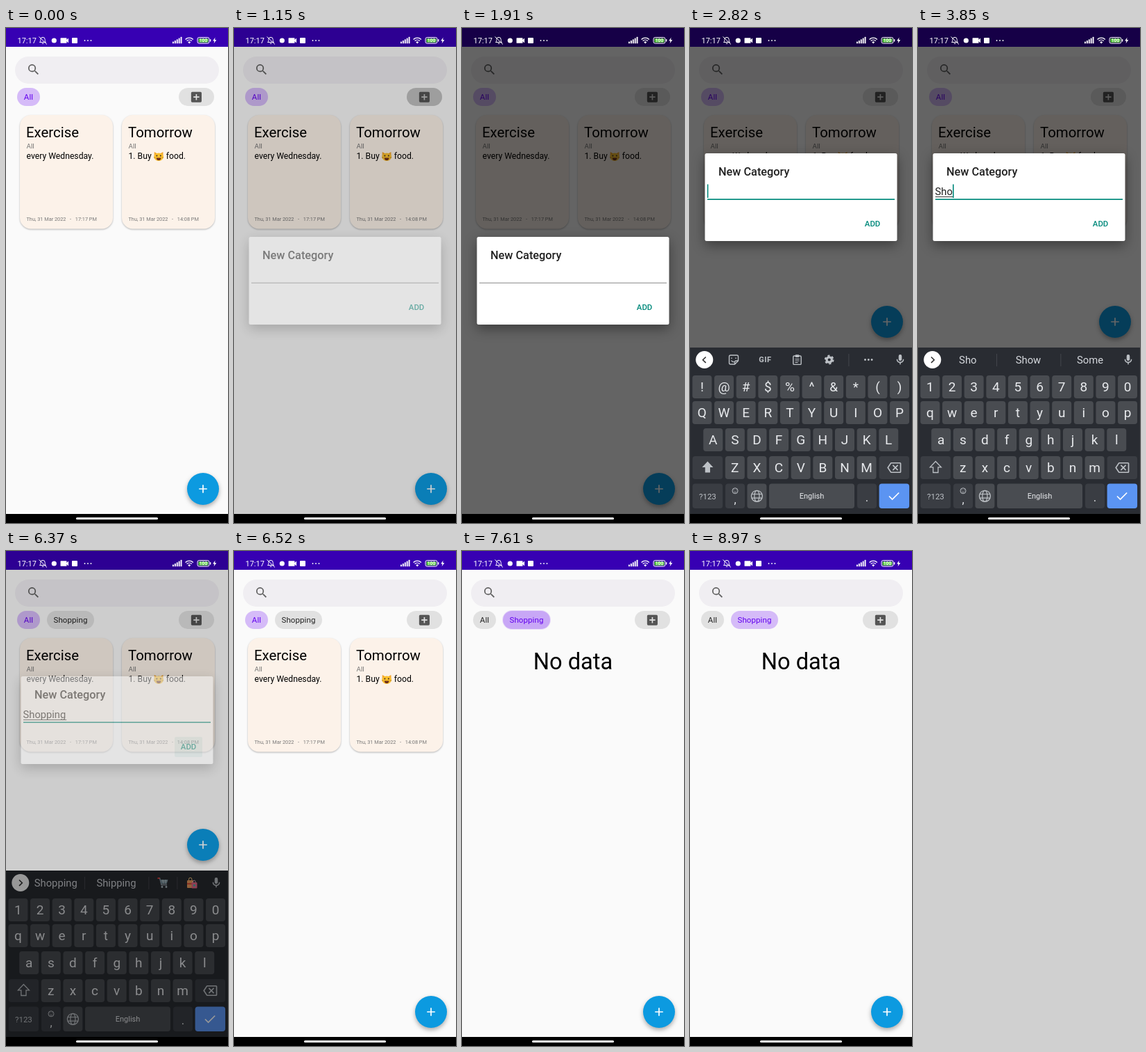
Recreate the animation shown at these times as an HTML page. Size 320x711 px, loop 9000 ms.

```html
<!DOCTYPE html>
<html lang="en">
<head>
<meta charset="utf-8">
<title>New category</title>
<style>
html, body { margin: 0; width: 100%; height: 100%; overflow: hidden; background: #000; }
svg { display: block; width: 100vw; height: 100vh; font-family: Roboto, "Noto Sans", sans-serif; }
</style>
</head>
<body>
<svg id="stage" viewBox="0 0 320 711"></svg>
<script>
const LOOP = 9000, WORD = 'Shopping';
const OPEN = 1080, FOCUS = 2350, CLOSE = 6290, RESIZE = 6480, PICK = 7460;
const TYPED = [2980, 3400, 3720, 4040, 4260, 4660, 5040, 5340];
const HINTS = ['', 'So', 'She', 'Show', 'Shop', 'Shopping', 'Shopping', 'Shopping', 'Shipping'];

const ramp = (t, from, to) => Math.max(0, Math.min(1, (t - from) / (to - from)));
const ease = p => 1 - (1 - p) ** 3;
const pulse = (t, from, span) => Math.min(ramp(t, from, from + 80), 1 - ramp(t, from + span / 2, from + span));

// SVG helpers
const box = (x, y, w, h, r, fill, more = '') =>
  `<rect x="${x}" y="${y}" width="${w}" height="${h}" rx="${r}" fill="${fill}" ${more}/>`;
const dot = (x, y, r, fill, more = '') => `<circle cx="${x}" cy="${y}" r="${r}" fill="${fill}" ${more}/>`;
const text = (s, x, y, size, fill, more = '') =>
  `<text x="${x}" y="${y}" font-size="${size}" fill="${fill}" ${more}>${s.replace('&', '&amp;')}</text>`;
const path = (d, fill, more = '') => `<path d="${d}" fill="${fill}" ${more}/>`;
const line = (d, color, width = 1.4, more = '') =>
  path(d, 'none', `stroke="${color}" stroke-width="${width}" ${more}`);
const group = (s, more) => `<g ${more}>${s}</g>`;
const icon = (d, cx, cy, k, fill) =>
  path(d, fill, `transform="translate(${cx - 12 * k} ${cy - 12 * k}) scale(${k})"`);
const MID = 'text-anchor="middle"', BOLD = 'font-weight="500"';
const shadow = (y, blur, a) => `style="filter:drop-shadow(0 ${y}px ${blur}px rgba(0,0,0,${a}))"`;

const SEARCH = 'M15.5 14h-.79l-.28-.27A6.47 6.47 0 0 0 16 9.5 6.5 6.5 0 1 0 9.5 16c1.61 0 3.09-.59 4.23-1.57l.27.28v.79l5 4.99L20.49 19zm-6 0a4.5 4.5 0 1 1 0-9 4.5 4.5 0 0 1 0 9z';
const ADD_BOX = 'M19 3H5a2 2 0 0 0-2 2v14a2 2 0 0 0 2 2h14a2 2 0 0 0 2-2V5a2 2 0 0 0-2-2zm-2 10h-4v4h-2v-4H7v-2h4V7h2v4h4z';
const MIC = 'M12 14a3 3 0 0 0 3-3V5a3 3 0 0 0-6 0v6a3 3 0 0 0 3 3zm5-3a5 5 0 0 1-10 0H5a7 7 0 0 0 6 6.92V21h2v-3.08A7 7 0 0 0 19 11z';
const CAMERA = 'M17 10.5V7a1 1 0 0 0-1-1H4a1 1 0 0 0-1 1v10a1 1 0 0 0 1 1h12a1 1 0 0 0 1-1v-3.5l4 4v-11z';
const ERASE = 'M22 3H7c-.69 0-1.23.35-1.59.88L0 12l5.41 8.11c.36.53.9.89 1.59.89h15a2 2 0 0 0 2-2V5a2 2 0 0 0-2-2zm0 16H7.07L2.4 12l4.66-7H22zm-11.59-2L14 13.41 17.59 17 19 15.59 15.41 12 19 8.41 17.59 7 14 10.59 10.41 7 9 8.41 12.59 12 9 15.59z';

const cat = path('M213.6 185l.2-7 4 2.2h4.6l4-2.2.2 7z', '#f3a52c') +
  `<ellipse cx="220.1" cy="185.2" rx="6.8" ry="5.8" fill="#fbc02d"/>` +
  dot(217.4, 183.6, 1, '#3e2723') + dot(222.8, 183.6, 1, '#3e2723') +
  path('M216.6 186.4h7q-.6 3.6-3.5 3.6t-3.5-3.6z', '#6d2f1c') +
  line('M213 186l2.4.4M227.2 186l-2.4.4', '#8d5a1b', .6);

const cart = line('M219 470h2.6l2.4 9.5h8', '#9aa7b0', 1.3) +
  path('M222 472h11.5l-1.8 6h-8.4z', '#78909c') + line('M224 474h8.5M226 472l1 6M230 472v6', '#cfd8dc', .7) +
  line('M218.5 470h3', '#e53935', 1.8) + dot(225, 482.5, 1.4, '#b0bec5') + dot(231, 482.5, 1.4, '#b0bec5');

const bags = line('M263.5 474v-2.5a2.2 2.2 0 0 1 4.4 0v2.5', '#ffcc80', 1) +
  box(261, 473, 9, 11, 1, '#f4a261') + box(261, 477, 9, 2, 0, '#e5533d') +
  line('M269.5 477v-2a1.8 1.8 0 0 1 3.6 0v2', '#f8bbd0', .9) +
  box(267.5, 476, 8, 8.5, 1, '#ec6a8c') + box(270, 479, 3, 2.5, 0, '#4db6ac');

const statusIcons = text('17:17', 16.5, 22, 11, '#fff') +
  line('M48.5 20.5h9c-1.3-1.2-1.3-2-1.3-4a3.2 3.2 0 0 0-6.4 0c0 2 0 2.8-1.3 4zM51.8 22.3h2.6M47.5 12.5l11.5 11', '#fff', 1) +
  dot(69.3, 18, 3.6, '#fff') + icon(CAMERA, 84.3, 18, .64, '#fff') + box(95, 14, 8, 8, 1, '#fff') +
  [113.5, 118, 122.5].map(x => dot(x, 18, .9, '#fff')).join('') +
  [0, 1, 2, 3, 4].map(i => box(240 + i * 2.9, 19.6 - i * 1.7, 1.9, 2.6 + i * 1.7, .5, '#fff')).join('') +
  line('M258.6 16.4a8 8 0 0 1 11.2 0M260.6 18.6a5.2 5.2 0 0 1 7.2 0', '#fff', 1.4) +
  path('M262.2 20.2a3 3 0 0 1 4 0l-2 2.3z', '#fff') +
  box(276, 13.5, 17, 8.6, 2.4, 'none', 'stroke="#fff"') + box(277.4, 14.9, 14.2, 5.8, 1.2, '#55c83c') +
  box(294, 16, 1.3, 3.6, .5, '#fff') + text('100', 284.5, 20.4, 6.6, '#fff', MID + ' font-weight="700"') +
  path('M301.5 13.5l-3.3 5h2.2l-.8 3.8 3.7-5.3h-2.3z', '#fff');

function chip(label, x, w, on) {
  return box(x, 86, w, 26, 13, on ? '#d5bbf8' : '#e1e1e1') +
    text(label, x + w / 2, 103.2, 11.5, on ? '#6200ee' : '#222', MID + ' letter-spacing=".1"');
}

function card(x, title, body, time) {
  const left = x + 9.5;
  return box(x, 125, 134, 163.5, 16, '#fcf2e9', shadow(1, 1, .28)) +
    text(title, left - .5, 157, 20.4, '#000') + text('All', left, 173, 9.8, '#757575') +
    body(left) + text('Thu, 31 Mar 2022', left, 276.6, 7.33, '#777') +
    text('-', left + 62.5, 276.6, 7.33, '#777') + text(time, left + 70.3, 276.6, 7.33, '#777');
}

const cards = card(20, 'Exercise', x => text('every Wednesday.', x, 188.3, 12.2, '#000'), '17:17 PM') +
  card(167, 'Tomorrow', x => text('1. Buy', x, 188.3, 12.2, '#000') + cat +
    text('food.', x + 54.3, 188.3, 12.2, '#000'), '14:08 PM');

function app(t) {
  const picked = t >= PICK, fabY = t >= FOCUS && t < RESIZE ? 422 : 662;
  const glow = pulse(t, PICK - 60, 480);
  return box(0, 0, 320, 711, 0, '#fafafa') + box(0, 0, 320, 27, 0, '#3700b3') +
    box(13, 41, 294, 39, 19.5, '#f0eef2') + icon(SEARCH, 39.7, 59.8, .86, '#616161') +
    chip('All', 16, 33, !picked) +
    (t >= CLOSE ? chip('Shopping', 59, 68, picked) +
      box(59, 86, 68, 26, 13, '#6200ee', `opacity="${glow * .1}" stroke="#6200ee" stroke-width="2"`) : '') +
    box(249, 86, 51, 26, 13, '#e1e1e1') + box(249, 86, 51, 26, 13, '#000', `opacity="${pulse(t, 950, 440) * .14}"`) +
    icon(ADD_BOX, 274.4, 99.2, .84, '#555') +
    (picked ? text('No data', 160, 170, 32.6, '#000', MID) : cards) +
    dot(284, fabY, 23, '#0c9ae0', shadow(3, 3, .32)) +
    line(`M278.2 ${fabY}h11.6M284 ${fabY - 5.8}v11.6`, '#fff', 1.7);
}

function dialog(t, count) {
  const alpha = t < CLOSE ? ramp(t, OPEN, OPEN + 150) : .95 * (1 - ramp(t, CLOSE, CLOSE + 160));
  if (!alpha) return '';
  const focused = t >= FOCUS, typed = WORD.slice(0, count);
  const since = t - (count ? TYPED[count - 1] : FOCUS);
  const end = 25.6 + [0, 8.7, 16.8, 25.2, 33.4, 41.7, 45.3, 53.4, 61.6][count];
  const y = 120 * (1 - ease(ramp(t, FOCUS + 20, FOCUS + 270)));
  return group(
    box(21.5, 180, 277, 126, 2.5, '#fff', shadow(6, 9, .4)) +
    text('New Category', 41, 211.8, 16.3, '#212121', BOLD) +
    text(typed, 24.6, 240.3, 14.7, '#212121') +
    (count ? box(25, 242, end - 25, .9, 0, '#212121') : '') +
    (focused ? box(25, 245.3, 270, 1.7, 0, '#00897b') : box(25, 245.7, 270, .9, 0, '#777')) +
    (focused && t < CLOSE && since % 1000 < 500 ? box(end - .8, 224.5, 1.6, 19.5, 0, '#00897b') : '') +
    box(243, 267, 40, 29, 2, '#00897b', `opacity="${pulse(t, 6130, 380) * .15}"`) +
    text('ADD', 251.8, 285.4, 11.4, '#00897b', BOLD),
    `opacity="${alpha}" transform="translate(0 ${y})"`);
}

const KEY = '#494c51', SIDE = '#3a3d43', INK = '#e8eaed', SOFT = '#bdc1c6';
const STEP = 31.63;
const ROWS = [['!@#$%^&*()', 17.4, 515.5], ['QWERTYUIOP', 17.4, 552.5], ['ASDFGHJKL', 33.2, 591.5], ['ZXCVBNM', 64.8, 631.5]];

function keyRows(caps) {
  return ROWS.map(([row, x, y], n) => {
    const chars = caps ? row : n ? row.toLowerCase() : '1234567890';
    return [...chars].map((c, i) => box(x + i * STEP - 14, y - 16.5, 28, 33, 4, KEY) +
      text(c, x + i * STEP, y + 6.3, 19, INK, MID)).join('');
  }).join('');
}

function popup(letter) {
  const [row, x, y] = ROWS.find(r => r[0].includes(letter.toUpperCase()));
  const cx = x + row.indexOf(letter.toUpperCase()) * STEP;
  return box(cx - 16, y - 58, 32, 74, 6, '#5d6066', shadow(1, 2, .4)) + text(letter, cx, y - 32, 23, INK, MID);
}

function toolbar(count) {
  const split = x => box(x, 468, .8, 18, 0, '#4a4d53');
  const chevron = count ? 'M19 472.5l4.3 4.2-4.3 4.2' : 'M22.8 472.5l-4.3 4.2 4.3 4.2';
  const start = dot(20.8, 476.5, 12.5, '#fff') + line(chevron, '#333', 1.6) + icon(MIC, 303, 476.5, .76, SOFT);
  if (count) {
    return start + text(WORD.slice(0, count), 71.8, 482, 14.8, '#d5d8dd', MID) + split(113) +
      text(HINTS[count], 159, 482, 14.8, '#d5d8dd', MID) + split(205.5) +
      (count > 3 ? cart + split(246.5) + bags : text('Some', 248, 482, 14.8, '#d5d8dd', MID));
  }
  return start +
    line('M58.5 470h9a2 2 0 0 1 2 2v6l-5 5h-6a2 2 0 0 1-2-2v-9a2 2 0 0 1 2-2zM69.5 478h-3a2 2 0 0 0-2 2v3M59.5 477.5q1.5 2.5 4 1.8M60 473.5v1.5M66 473.5v1.5', SOFT) +
    text('GIF', 108.3, 480.4, 11, SOFT, MID + ' font-weight="700" letter-spacing=".5"') +
    box(148.8, 471, 11.4, 12.4, 1.5, 'none', `stroke="${SOFT}" stroke-width="1.4"`) + box(151.7, 469.3, 5.6, 3.6, 1, SOFT) +
    line('M151.5 475.5h6M151.5 478h6M151.5 480.5h4', SOFT, 1) +
    dot(200.7, 476.5, 3.7, 'none', `stroke="${SOFT}" stroke-width="3.2"`) +
    dot(200.7, 476.5, 5.8, 'none', `stroke="${SOFT}" stroke-width="2.2" stroke-dasharray="3.04 3.04"`) +
    split(228.5) + [252.5, 257.3, 262.1].map(x => dot(x, 476.5, 1.4, SOFT)).join('');
}

function keyboard(t, count) {
  if (t < FOCUS + 30 || t >= RESIZE) return '';
  const rise = 252 * (1 - ease(ramp(t, FOCUS + 30, FOCUS + 280)));
  const alpha = 1 - ramp(t, CLOSE, CLOSE + 200);
  const caps = !count, last = TYPED[count - 1];
  const arrow = 'M25.4 622.5l8 8.4h-4.4v7.6h-7.2v-7.6h-4.4z';
  const body = box(0, 459, 320, 239, 0, '#292c32') + toolbar(count) + keyRows(caps) +
    box(3.6, 615, 43.5, 33, 4, SIDE) + (caps ? path(arrow, SOFT) : line(arrow, SOFT, 1.3)) +
    box(272.6, 615, 43.5, 33, 4, SIDE) + icon(ERASE, 294.3, 631.5, .84, SOFT) +
    box(3.6, 654.5, 43.5, 35.5, 4, SIDE) + text('?123', 25.4, 676.5, 11.5, SOFT, MID) +
    box(51, 654.5, 28, 35.5, 4, SIDE) + dot(65, 664.8, 4, 'none', `stroke="${SOFT}"`) +
    line('M63 666q2 2 4 0M63.5 663v1M66.5 663v1', SOFT, .8) + text(',', 65, 683, 16, INK, MID) +
    box(82.4, 654.5, 28, 35.5, 4, KEY) + dot(96.4, 672.3, 8, 'none', `stroke="${SOFT}" stroke-width="1.3"`) +
    `<ellipse cx="96.4" cy="672.3" rx="3.6" ry="8" fill="none" stroke="${SOFT}" stroke-width="1.2"/>` +
    line('M89 669.5h14.8M89 675.1h14.8', SOFT, 1.2) +
    box(114, 654.5, 123, 35.5, 4, KEY) + text('English', 175.5, 676.3, 11, INK, MID) +
    box(241, 654.5, 28, 35.5, 4, SIDE) + text('.', 255, 680, 17, INK, MID) +
    box(272.6, 654.5, 43.5, 35.5, 4, '#5b94f2') + line('M287 672.5l4.6 4.6 9.6-9.6', '#fff', 1.7) +
    (count && t - last < 120 ? popup(WORD[count - 1]) : '');
  return group(box(0, 459, 320, 252, 0, '#000') + group(body, `opacity="${alpha}"`), `transform="translate(0 ${rise})"`);
}

function scene(t) {
  const count = TYPED.filter(k => k <= t).length;
  const dim = .6 * (ramp(t, OPEN + 25, OPEN + 175) - ramp(t, CLOSE - 20, CLOSE + 125));
  return app(t) + box(0, 0, 320, 711, 0, '#000', `opacity="${dim}"`) + statusIcons +
    dialog(t, count) + box(0, 698, 320, 13, 0, '#000') + keyboard(t, count) +
    box(101, 703, 118, 3, 1.5, '#fff');
}

const stage = document.getElementById('stage');
function draw() {
  stage.innerHTML = scene(performance.now() % LOOP);
  requestAnimationFrame(draw);
}
draw();
</script>
</body>
</html>
```
